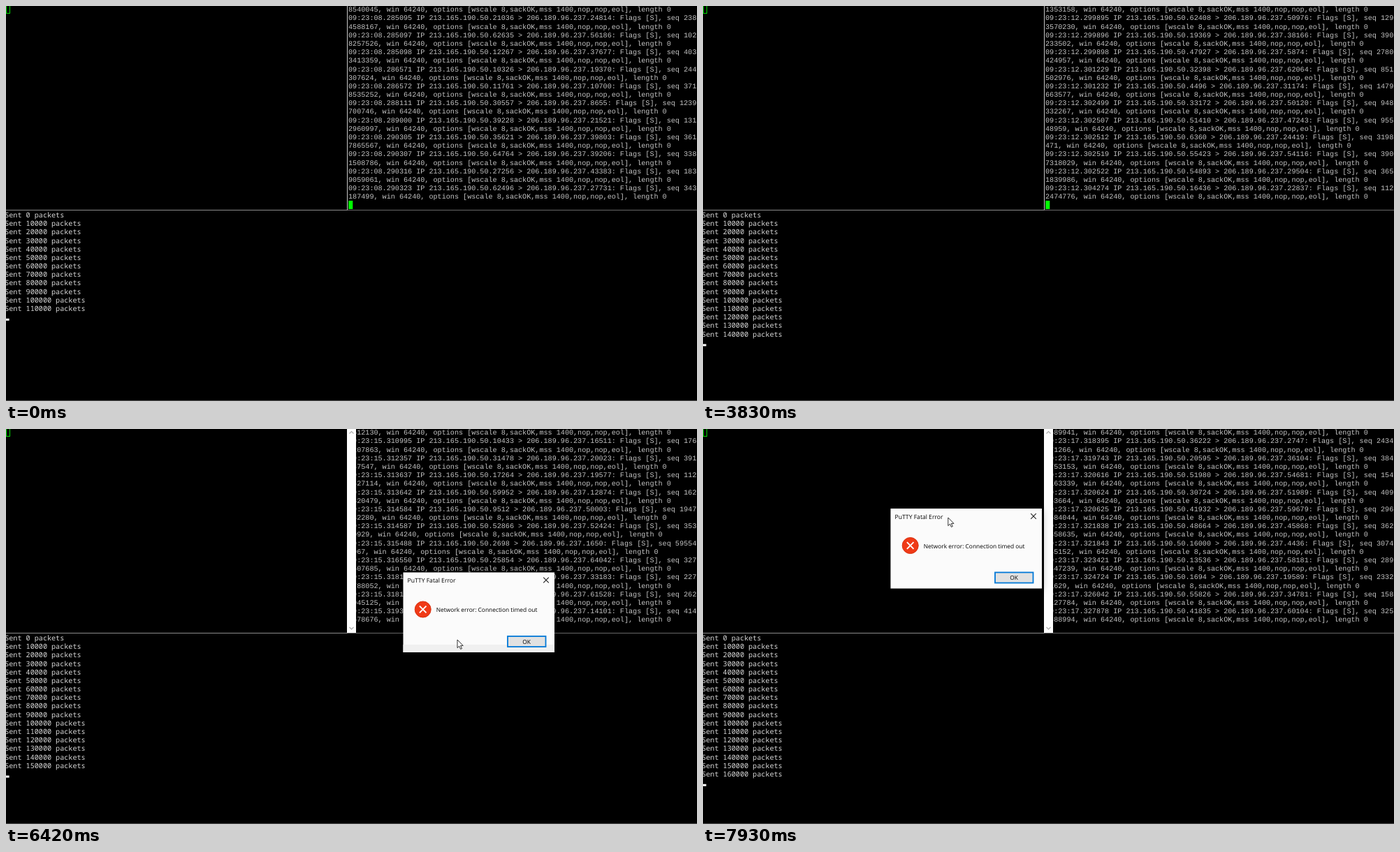
An HTML page that plays this animation: 989x566 px, repeating every 7990 ms.

```html
<!DOCTYPE html>
<html lang="en">
<head>
<meta charset="utf-8">
<title>Terminals and a lost connection</title>
<style>
  html, body { margin: 0; width: 100%; height: 100%; overflow: hidden; background: #000; }
  svg { display: block; width: 100%; height: 100%; }
  text { white-space: pre; text-rendering: geometricPrecision; }
  .dump { font: 10.15px "Liberation Mono", monospace; fill: #c4c4c4; }
  .sent { font: 10.15px "Noto Sans Mono", monospace; fill: #d8d8d8; }
  .ui { font: 8.4px "Open Sans", sans-serif; fill: #000; }
</style>
</head>
<body>
<svg viewBox="0 0 989 566" preserveAspectRatio="none">
  <defs>
    <clipPath id="below"><rect y="293" width="989" height="273"/></clipPath>
    <filter id="shadow" x="-20%" y="-30%" width="140%" height="160%">
      <feDropShadow dx="0" dy="2" stdDeviation="6" flood-opacity=".3"/>
    </filter>
  </defs>
  <rect width="989" height="566"/>
  <rect x=".5" y="-1.5" width="5" height="12" fill="none" stroke="#00d800"/>
  <g id="dump" class="dump"></g>
  <rect x="490.3" y="279" width="6" height="12" fill="#0f0"/>
  <rect x="488" width="1" height="292" fill="#c8c8c8"/>
  <rect y="292" width="489" height="1" fill="#8c8c8c"/>
  <rect x="489" y="292" width="500" height="1" fill="#686868"/>
  <rect y="565" width="989" height="1" fill="#4a4a4a"/>
  <g id="sent" class="sent"></g>
  <rect id="caret" width="4.6" height="3" fill="#fff"/>

  <g id="scroll">
    <rect x="488" width="13" height="292" fill="#fdfdfd"/>
    <path d="M491.5 6.5l3-3 3 3M491.5 284l3 3 3-3" fill="none" stroke="#aaa" stroke-width="1.1"/>
  </g>

  <g id="layer">
    <g id="dialog">
      <rect id="face" width="216.5" height="114.5" filter="url(#shadow)"/>
      <rect id="strip" y="103.5" width="216.5" height="11" fill="#f0f0f0"/>
      <text class="ui" x="6" y="14.6" style="font-size:8.6px">PuTTY Fatal Error</text>
      <path d="M200.7 7.2l7.6 7.6M208.3 7.2l-7.6 7.6" stroke="#222" stroke-width="1.1"/>
      <circle cx="28.2" cy="53" r="11.5" fill="#f03a17" stroke="#d83313"/>
      <path d="M23.4 48.2l9.6 9.6M33 48.2l-9.6 9.6" stroke="#fff" stroke-width="1.9"/>
      <text class="ui" x="47.3" y="56.6">Network error: Connection timed out</text>
      <rect x="149.5" y="91.5" width="54.5" height="15" fill="#e1e1e1" stroke="#0078d7" stroke-width="1.8"/>
      <text class="ui" x="176.6" y="102.1" text-anchor="middle">OK</text>
    </g>
  </g>

  <g id="mouse">
    <path id="arrow" d="M0 0V11.6L2.7 9.1 4.6 13.4 6.5 12.6 4.6 8.4H8.2Z" fill="#fff" stroke="#000" stroke-width=".8"/>
    <path id="beam" d="M-2-5.5H-.6L0-5 .6-5.5H2M0-5V5M-2 5.5H-.6L0 5 .6 5.5H2" fill="none" stroke="#e8e8e8" stroke-width=".9"/>
  </g>
</svg>
<script>
const LOOP = 7990, PITCH = 12.18, ROWS = 23, COLS = 82;
const FIRST_SEC = 8, HALF_PAINT = 65;
const SENT_AT_START = 13, SENT_EVERY = 1910;
const POP = 4600, POINTER_ON = 5410, RAISE = 6280, DRAG = 7470, DRAG_END = 7930;
const TICK = 71.5;

const el = id => document.getElementById(id);
const show = (id, on) => el(id).setAttribute("display", on ? "inline" : "none");
const move = (id, x, y, more = "") => el(id).setAttribute("transform", `translate(${x} ${y})${more}`);
const clamp = v => Math.max(0, Math.min(1, v));
const mix = (a, b, f) => a + (b - a) * f;
const smooth = f => f * f * (3 - 2 * f);

function random(seed) {
  return () => {
    seed = seed + 0x6D2B79F5 | 0;
    let n = Math.imul(seed ^ seed >>> 15, 1 | seed);
    n = n + Math.imul(n ^ n >>> 7, 61 | n) ^ n;
    return ((n ^ n >>> 14) >>> 0) / 4294967296;
  };
}

// One screen of captured packets, wrapped at the terminal width.
function screenRows(sec, part) {
  const rnd = random(sec * 10 + part), int = n => Math.floor(rnd() * n);
  const port = () => 1024 + int(64000);
  const ending = ", win 64240, options [wscale 8,sackOK,mss 1400,nop,nop,eol], length 0";
  const rows = [1000000 + int(8999999) + ending];
  let micros = 285095 + 3700 * (sec - FIRST_SEC) - 4000 * (1 - part);
  while (rows.length < ROWS) {
    const line = `09:23:${String(sec).padStart(2, "0")}.${micros} IP 213.165.190.50.${port()} > ` +
      `206.189.96.237.${port()}: Flags [S], seq ${int(2 ** 32)}${ending}`;
    rows.push(line.slice(0, COLS), line.slice(COLS));
    micros += rnd() < .6 ? 1 + int(9) : 800 + int(1100);
  }
  return rows;
}

function addRows(id, count, x, y) {
  return Array.from({ length: count }, (_, i) => {
    const row = document.createElementNS("http://www.w3.org/2000/svg", "text");
    row.setAttribute("x", x);
    row.setAttribute("y", y + PITCH * i);
    return el(id).appendChild(row);
  });
}

const dumpRows = addRows("dump", ROWS, 490, 8.3);
const sentRows = addRows("sent", 17, -1.8, 303);
sentRows.forEach((row, i) => row.textContent = `Sent ${i * 10000} packets`);

function glide(keys, t) {
  const i = keys.findIndex(k => k[0] > t);
  if (i < 0) return keys[keys.length - 1].slice(1);
  if (i === 0) return keys[0].slice(1);
  const a = keys[i - 1], b = keys[i], f = (t - a[0]) / (b[0] - a[0]);
  return [mix(a[1], b[1], f), mix(a[2], b[2], f)];
}

// Each repaint comes in two halves.
const repaints = [80, 1080, 2060, 3060, 3970, 4970, 5960, 6940, 7850];
const pointer = [
  [POINTER_ON, 940, 150], [5839, 641, 269], [6190, 646, 302],
  [6800, 646, 302], [7080, 653, 233], [7190, 650.5, 218.5]
];

let shown;
function drawDump(t) {
  const done = repaints.filter(r => r <= t).length;
  const part = done && t - repaints[done - 1] < HALF_PAINT ? 0 : 1;
  const key = done * 2 + part;
  if (key === shown) return;
  shown = key;
  screenRows(FIRST_SEC + done, part).forEach((line, i) => dumpRows[i].textContent = line);
}

function drawSent(t) {
  const count = SENT_AT_START + Math.floor((t + SENT_EVERY - 1920) / SENT_EVERY + 1e-6);
  sentRows.forEach((row, i) => row.setAttribute("display", i < count ? "inline" : "none"));
  move("caret", 0, 301.7 + PITCH * count);
}

function dialogPlace(t) {
  if (t < DRAG) return [568.5, 205.5];
  const f = smooth(clamp(Math.floor((t - DRAG) / (DRAG_END - DRAG) * 6 + .01) / 6));
  return [mix(544, 268.5, f), mix(194, 114, f)];
}

function drawDialog(t, x, y) {
  const raised = t >= RAISE;
  show("scroll", raised);
  show("layer", t >= POP);
  const f = clamp(Math.floor((t - POP) / 65) / 2), size = mix(.98, 1, f);
  move("dialog", x + 107.5 * (1 - size), y + 56 * (1 - size), ` scale(${size})`);
  el("dialog").setAttribute("opacity", mix(.6, 1, f));
  el("layer").setAttribute("clip-path", raised ? "none" : "url(#below)");
  el("face").setAttribute("fill", raised ? "#fbfbfb" : "#f0f0f0");
  show("strip", t < DRAG);
}

function drawMouse(t, x, y) {
  const tick = POINTER_ON + Math.floor((t - POINTER_ON) / TICK) * TICK;
  const [mx, my] = t < DRAG ? glide(pointer, tick) : [x + 82.3, y + 13];
  const onDialog = t >= RAISE || my > 292;
  show("mouse", t >= POINTER_ON);
  move("mouse", mx, my);
  show("arrow", onDialog);
  show("beam", !onDialog);
}

function draw(t) {
  const [x, y] = dialogPlace(t);
  drawDump(t);
  drawSent(t);
  drawDialog(t, x, y);
  drawMouse(t, x, y);
}

const start = performance.now();
function loop() {
  draw((performance.now() - start) % LOOP);
  requestAnimationFrame(loop);
}
loop();
</script>
</body>
</html>
```
